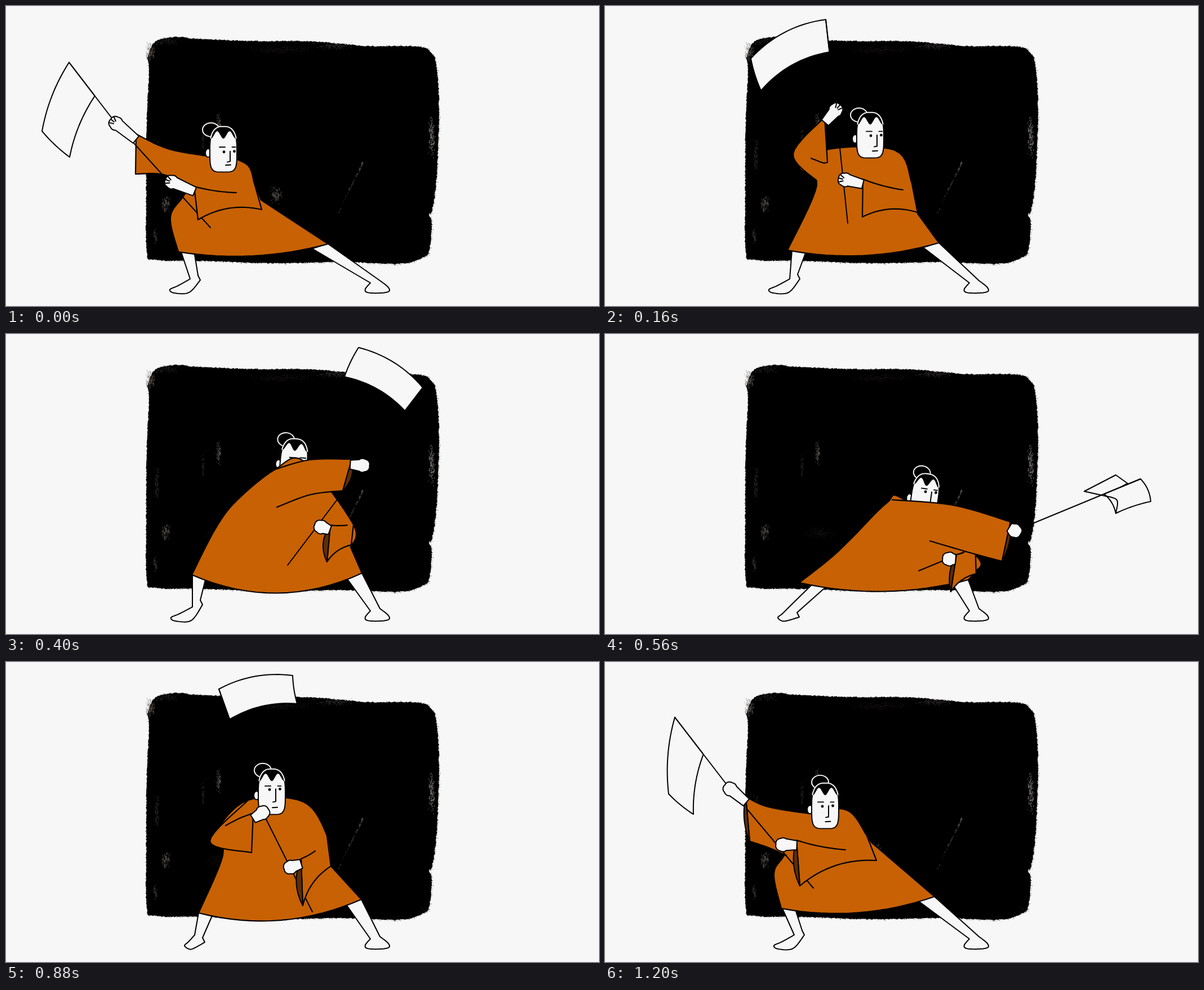
An HTML page with a canvas for the animation above (1280 ms loop, 1053 by 532 pixels).

```html
<!DOCTYPE html>
<html lang="en">
<head>
<meta charset="utf-8">
<title>Flag dancer</title>
<style>
html, body { margin: 0; width: 100%; height: 100%; overflow: hidden; background: #f7f7f7; }
canvas { display: block; width: 100vw; height: 100vh; }
</style>
</head>
<body>
<canvas id="stage" width="1053" height="532"></canvas>
<script>
const W = 1053, H = 532, STEP = 80, STEPS = 16;
const PAPER = '#f7f7f7', INK = '#000', ROBE = '#c76104', LINING = '#5c2e06';
const ctx = document.getElementById('stage').getContext('2d');

// Joints of each key pose, as x, y pairs:
// head    x, y, tilt, bun shift, look x, look y
// trunk   left hem, side, armpit, neck left, neck right, shoulder, waist, right hem; hem is its sag
// arm     root, elbow, cuff top, cuff bottom, underside, fold end
// sleeve  fold end, cuff top, cuff bottom, elbow
// far, near  fists; base  lower end of the pole
// flag    pole tip and the two loose corners; cloth is its width on the pole and its bow
// linings  bulge of the far and near lining; leg  hip shift, heel x, heel y, toe x
const poses = [
  { at: 0, fingers: true, head: [386, 254, 0, -22, 0, 0],
    trunk: [306, 436, 292, 374, 318, 333, 357, 267, 425, 279, 442, 318, 453, 344, 572, 422], hem: [14],
    arm: [372, 268, 290, 254, 231, 227, 230, 298, 280, 299, 335, 322],
    sleeve: [409, 331, 334, 320, 341, 379, 454, 361], far: [195, 208], near: [294, 312],
    base: [363, 393], flag: [112, 100, 64, 222, 113, 268], cloth: [75, .05],
    linings: [0, 0], leg: [5, 345, 486, 291] },
  { at: 2, fingers: true, head: [471, 229, 0, -20, 0, -4],
    trunk: [324, 433, 376, 318, 346, 286, 398, 254, 515, 256, 545, 315, 555, 368, 593, 420], hem: [16],
    arm: [376, 310, 334, 262, 390, 197, 395, 277, 387, 278, 366, 270],
    sleeve: [529, 326, 458, 307, 457, 374, 555, 366], far: [410, 184], near: [426, 308],
    base: [431, 385], flag: [392, 24, 259, 93, 277, 150], cloth: [58, .09],
    linings: [0, 0], leg: [8, 346, 484, 291] },
  { at: 5, behind: true, shut: true, head: [511, 226, 5, -17, -4, -13],
    trunk: [330, 427, 372, 345, 410, 295, 478, 240, 530, 226, 617, 338, 612, 378, 632, 424], hem: [34],
    arm: [478, 240, 540, 223, 614, 222, 598, 278, 540, 285, 481, 307],
    sleeve: [606, 339, 576, 339, 570, 404, 613, 374], far: [634, 233], near: [559, 342],
    base: [500, 410], flag: [740, 95, 626, 24, 601, 76], cloth: [52, .08],
    linings: [-.14, .15], leg: [1, 349, 480, 293] },
  { at: 7, behind: true, head: [568, 288, 8, -11, -1, -14],
    trunk: [345, 441, 400, 398, 440, 360, 500, 300, 530, 293, 658, 392, 660, 420, 645, 436], hem: [18],
    arm: [510, 294, 620, 304, 720, 333, 705, 403, 645, 387, 577, 367],
    sleeve: [636, 388, 624, 391, 614, 457, 659, 425], far: [728, 349], near: [611, 399],
    base: [557, 420], flag: [951, 257, 969, 297, 907, 318], cloth: [70, -.09],
    flap: [928, 265, 907, 250, 851, 279, 887, 287],
    linings: [-.08, .1], leg: [26, 345, 502, 307] },
  { at: 11, head: [472, 230, 0, -16, -5, -9],
    trunk: [342, 445, 385, 343, 375, 300, 430, 245, 528, 248, 570, 308, 577, 362, 631, 421], hem: [25],
    arm: [430, 245, 362, 318, 436, 338, 439, 268, 415, 277, 390, 290],
    sleeve: [549, 335, 524, 349, 527, 432, 577, 362], far: [456, 267], near: [505, 364],
    base: [544, 443], flag: [378, 48, 509, 24, 517, 74], cloth: [57, -.08],
    linings: [0, .12], leg: [0, 353, 497, 317] },
  { at: 13, flip: true, head: [408, 252, -9.5, -14, -3, -10],
    trunk: [332, 448, 314, 388, 340, 369, 390, 272, 455, 252, 500, 298, 513, 317, 625, 412], hem: [32],
    arm: [385, 278, 340, 289, 294, 263, 308, 346, 330, 357, 345, 368],
    sleeve: [459, 339, 380, 354, 405, 416, 529, 352], far: [273, 262], near: [358, 370],
    base: [394, 423], flag: [182, 107, 256, 74, 282, 127], cloth: [60, -.06],
    flap: [263, 100, 281, 94, 302, 146, 278, 146],
    linings: [.1, .12], leg: [10, 366, 492, 315] },
  { at: 15, head: [391, 255, 0, -9, -6, -4],
    trunk: [313, 437, 300, 376, 319, 342, 367, 271, 430, 263, 465, 308, 473, 320, 585, 416], hem: [18],
    arm: [370, 270, 290, 257, 250, 239, 257, 318, 290, 329, 322, 343],
    sleeve: [427, 333, 340, 316, 346, 397, 482, 352], far: [222, 225], near: [315, 324],
    base: [370, 401], flag: [124, 98, 113, 234, 157, 270], cloth: [83, .05],
    linings: [.08, .1], leg: [2, 354, 484, 300] }
];

const mix = (a, b, u) => a + (b - a) * u;
const mixAll = (a, b, u) => a.map((v, i) => mix(v, b[i], u));
const pairs = a => Array.from({ length: a.length / 2 }, (_, i) => [a[2 * i], a[2 * i + 1]]);
const toward = (a, b, d) => mixAll(a, b, d / (Math.hypot(b[0] - a[0], b[1] - a[1]) || 1));

// Swings a list of points round the moving lower end of the pole
function swing(a, b, u, from, to) {
  const hub = mixAll(from, to, u), q = pairs(b);
  const polar = (p, c) => [Math.atan2(p[1] - c[1], p[0] - c[0]), Math.hypot(p[0] - c[0], p[1] - c[1])];
  return pairs(a).flatMap((p, i) => {
    const [a1, r1] = polar(p, from), [a2, r2] = polar(q[i], to);
    const ang = mix(a1, a2, u), dip = .02 * (a2 - a1) ** 2 * Math.sin(Math.PI * u);
    const r = mix(r1, r2, u) * (1 - dip);
    return [hub[0] + Math.cos(ang) * r, hub[1] + Math.sin(ang) * r];
  });
}

function between(a, b, u) {
  const { flip, behind, shut, fingers } = u < .5 ? a : b;
  const out = { flip, behind, shut, fingers };
  for (const k of ['head', 'trunk', 'hem', 'arm', 'sleeve', 'near', 'base', 'cloth', 'linings', 'leg'])
    out[k] = mixAll(a[k], b[k], u);
  for (const k of ['far', 'flag']) out[k] = swing(a[k], b[k], u, a.base, b.base);
  return out;
}

const drawings = Array.from({ length: STEPS }, (_, s) => {
  const i = poses.findLastIndex(p => p.at <= s), a = poses[i], b = poses[i + 1];
  return a.at === s ? a : between(a, b, (s - a.at) / (b.at - a.at));
});

// Smooth line through the points
function spline(p) {
  const at = i => p[Math.max(0, Math.min(p.length - 1, i))], out = [p[0]];
  for (let i = 0; i < p.length - 1; i++) {
    const a = at(i - 1), b = at(i), c = at(i + 1), d = at(i + 2);
    for (let t = .125; t <= 1; t += .125)
      out.push([0, 1].map(j => .5 * (2 * b[j] + (c[j] - a[j]) * t +
        (2 * a[j] - 5 * b[j] + 4 * c[j] - d[j]) * t * t +
        (3 * b[j] - a[j] - 3 * c[j] + d[j]) * t ** 3)));
  }
  return out;
}

// Arc from a to b, bulging to its right by k of its length
function bow(a, b, k) {
  const dx = b[0] - a[0], dy = b[1] - a[1];
  return Array.from({ length: 17 }, (_, i) => {
    const t = i / 16, h = 4 * k * t * (1 - t);
    return [a[0] + dx * t - dy * h, a[1] + dy * t + dx * h];
  });
}

function shape(line, fill, stroke, width = 2, close = false, c = ctx) {
  c.beginPath();
  line.forEach(p => c.lineTo(p[0], p[1]));
  if (close) c.closePath();
  if (fill) { c.fillStyle = fill; c.fill(); }
  if (stroke) { c.strokeStyle = stroke; c.lineWidth = width; c.stroke(); }
}

// Painted black panel with dry-brush edges
let seed = 7;
const rnd = () => (seed = seed * 16807 % 2147483647) / 2147483647;

function dust(c, x, y, w, h, n, shade) {
  c.fillStyle = `rgb(${shade + 6},${shade + 1},${shade - 3})`;
  for (let i = 0; i < n; i++) {
    c.globalAlpha = .2 + rnd() * .6;
    c.fillRect(x + (rnd() + rnd()) / 2 * w, y + (rnd() + rnd()) / 2 * h, .6 + rnd(), h > w ? 1 + rnd() * 3 : 1);
  }
  c.globalAlpha = 1;
}

function makePanel() {
  const cv = document.createElement('canvas');
  cv.width = W; cv.height = H;
  const c = cv.getContext('2d');
  c.fillStyle = PAPER;
  c.fillRect(0, 0, W, H);
  const edge = spline(pairs([251, 92, 264, 64, 300, 55, 340, 58, 430, 62, 545, 63, 640, 71, 732, 72, 756, 84,
    764, 104, 769, 180, 765, 300, 757, 362, 751, 369, 756, 385, 752, 432, 742, 445, 700, 457, 600, 454,
    475, 456, 350, 452, 265, 450, 250, 436, 249, 330, 250, 200, 254, 120, 251, 92]));
  const rough = edge.flatMap((p, i) => {
    const q = edge[i + 1] || p, n = Math.ceil(Math.hypot(q[0] - p[0], q[1] - p[1]) / 2);
    return Array.from({ length: n }, (_, k) => mixAll(p, q, k / n).map(v => v + rnd() * 1.6 - .8));
  });
  shape(rough, INK, null, 0, true, c);
  for (const p of rough) dust(c, p[0] - 2, p[1] - 2, 4, 4, 1, 16);
  // x, y, width, height, shade of each worn patch
  const worn = [[247, 62, 18, 36, 110], [262, 55, 50, 14, 70], [545, 64, 75, 13, 100], [430, 70, 120, 15, 36],
    [749, 190, 13, 80, 130], [372, 188, 10, 48, 90], [346, 208, 6, 45, 45], [262, 232, 10, 62, 45],
    [274, 332, 18, 34, 80], [260, 392, 8, 32, 60], [468, 318, 22, 34, 90], [680, 446, 28, 14, 24],
    [730, 432, 24, 15, 24], [350, 340, 62, 26, 30]];
  for (const [x, y, w, h, shade] of worn) dust(c, x, y, w, h, w * h * .17, shade);
  for (let i = 0; i < 70; i++) {
    const t = rnd() * rnd();
    dust(c, 631 - 48 * t, 274 + 98 * t, 4, 5, 1, 90);
  }
  return cv;
}
const panel = makePanel();

function oval(x, y, rx, ry, fill, stroke) {
  ctx.beginPath();
  ctx.ellipse(x, y, rx, ry, 0, 0, 7);
  ctx.fillStyle = fill;
  ctx.fill();
  if (stroke) { ctx.strokeStyle = stroke; ctx.lineWidth = 2; ctx.stroke(); }
}

// Domed on top, squarer at the chin
const face = Array.from({ length: 65 }, (_, i) => {
  const a = Math.PI * (1 + i / 32), e = i <= 32 ? .75 : .45;
  const pow = v => Math.sign(v) * Math.abs(v) ** e;
  return [24 * pow(Math.cos(a)), 43 * pow(Math.sin(a))];
});
const crown = face.slice(4, 29);
const hairline = Array.from({ length: 25 }, (_, i) => {
  const x = 24 - 2 * i;
  return [x, -27 + 7 * Math.cos(x * Math.PI / 11)];
});

function drawHead({ head: [x, y, tilt, bun, ex, ey], flip, shut }) {
  const line = (...p) => shape(p, null, INK);
  ctx.save();
  ctx.translate(x, y);
  ctx.rotate(tilt * Math.PI / 180);
  ctx.scale(flip ? -1 : 1, .94);
  oval(bun, -50 - bun * .6, 15, 13, INK, PAPER);
  oval(-27, 7, 5, 8, PAPER, INK);
  shape(face, PAPER, INK, 2, true);
  shape(crown.concat(hairline), INK);
  shape(crown, null, PAPER);
  for (const k of [0, 1]) {
    const px = 1 + 18.5 * k + ex, py = 5 - k + ey;
    if (shut) { line([px - 5, py + 1], [px + 5, py + 1]); continue; }
    oval(px, py, 2.4, 2.6, INK);
    line([px - 8 + 4 * k, -4 + ey * .75], [px + 2, -4 + ey * .75]);
  }
  if (!shut) {
    const ny = 23 + ey * .5;
    line([12 + ex, 4 + ey], [12 + ex, ny], [7 + ex, ny + 1]);
    line([4 + ex * .6, 30], [13 + ex * .6, 29.5]);
  }
  ctx.restore();
}

// Fist with knuckles, joined to the cuff at the wrist
function drawHand([x, y], wrist, fingers) {
  const out = Math.atan2(y - wrist[1], x - wrist[0]);
  const spot = (a, r) => [x + Math.cos(out + a) * r, y + Math.sin(out + a) * r];
  const side = k => [wrist[0] - Math.sin(out) * k, wrist[1] + Math.cos(out) * k];
  const line = [side(-8)];
  for (let a = -2.2; a <= 2.2; a += .1) line.push(spot(a, 11.5 + Math.abs(Math.sin(a * 2.5))));
  shape([...line, side(8)], PAPER, INK, 2, true);
  if (fingers) for (const a of [-.6, 0, .6]) shape([spot(a, 11), spot(a * 1.4, 4)], null, INK);
}

function drawLegs({ trunk, leg: [hip, hx, hy, toe] }) {
  const [lx, ly] = trunk, [rx, ry] = trunk.slice(-2), ankle = [hx - 18, 484];
  const foot = spline([ankle, [mix(ankle[0], toe, .6), 496], [toe, 503], [toe + 8, 509], [hx - 20, 508], [hx, hy]]);
  shape([[lx + hip, ly], ...foot, [hx - 4, hy - 8], [lx + hip + 24, ly + 5]], PAPER, INK);
  const heel = spline([[647, 491], [638, 502], [642, 508], [664, 509], [680, 506], [678, 498], [664, 487]]);
  shape([[rx - 27, ry + 9], ...heel, [rx, ry]], PAPER, INK);
}

function drawFlag({ flag, far, cloth: [width, bend], flap }) {
  const [tip, c1, c2] = pairs(flag), low = toward(tip, far, width);
  if (flap) shape(pairs(flap), PAPER, INK, 2, true);
  shape([...bow(tip, c1, bend), ...bow(c1, c2, .03), ...bow(c2, low, -bend)], PAPER, INK, 2, true);
  if (flap) {
    const end = flap.slice(-2), mid = mixAll(end, c2, .5);
    shape(spline([end, [mid[0] + 12, mid[1] - 8], c2]), null, INK);
  }
}

function drawBody(d) {
  const t = pairs(d.trunk), hemL = t[0], hemR = t[7];
  const sag = d.hem[0] / Math.hypot(hemR[0] - hemL[0], hemR[1] - hemL[1]);
  shape([...spline(t.slice(0, 7)), ...bow(hemR, hemL, -sag)], ROBE, INK, 2.2, true);
}

function drawArm({ arm }) {
  const a = pairs(arm);
  shape([...spline(a.slice(0, 3)), ...spline(a.slice(3))], ROBE, INK, 2.2);
}

function drawSleeve({ sleeve, trunk }) {
  const [fold, top, low, elbow] = pairs(sleeve), shoulder = trunk.slice(10, 12);
  shape([...bow(fold, top, -.03), ...bow(low, elbow, -.1), shoulder], ROBE, INK, 2.2);
}

const drawLining = (a, b, k) => k && shape(bow(a, b, k), LINING, INK, 2, true);

function draw(d) {
  const [up, low] = pairs(d.arm).slice(2), [, top, bottom] = pairs(d.sleeve);
  const dist = p => Math.hypot(p[0] - d.far[0], p[1] - d.far[1]);
  const wrist = dist(up) < dist(low) ? toward(up, low, 10) : toward(low, up, 10);
  const pole = () => shape([d.base, d.far, d.flag.slice(0, 2)], null, INK);
  ctx.lineJoin = ctx.lineCap = 'round';
  ctx.drawImage(panel, 0, 0);
  drawFlag(d);
  drawLegs(d);
  if (d.behind) drawHead(d);
  drawBody(d);
  if (d.behind) pole();
  drawArm(d);
  if (!d.behind) { pole(); drawHead(d); }
  drawSleeve(d);
  drawLining(top, bottom, d.linings[1]);
  drawHand(d.near, toward(top, bottom, 9), d.fingers);
  drawLining(up, low, d.linings[0]);
  drawHand(d.far, wrist, d.fingers);
}

const start = performance.now();
function tick() {
  draw(drawings[Math.floor((performance.now() - start) / STEP) % STEPS]);
  requestAnimationFrame(tick);
}
tick();
</script>
</body>
</html>
```
